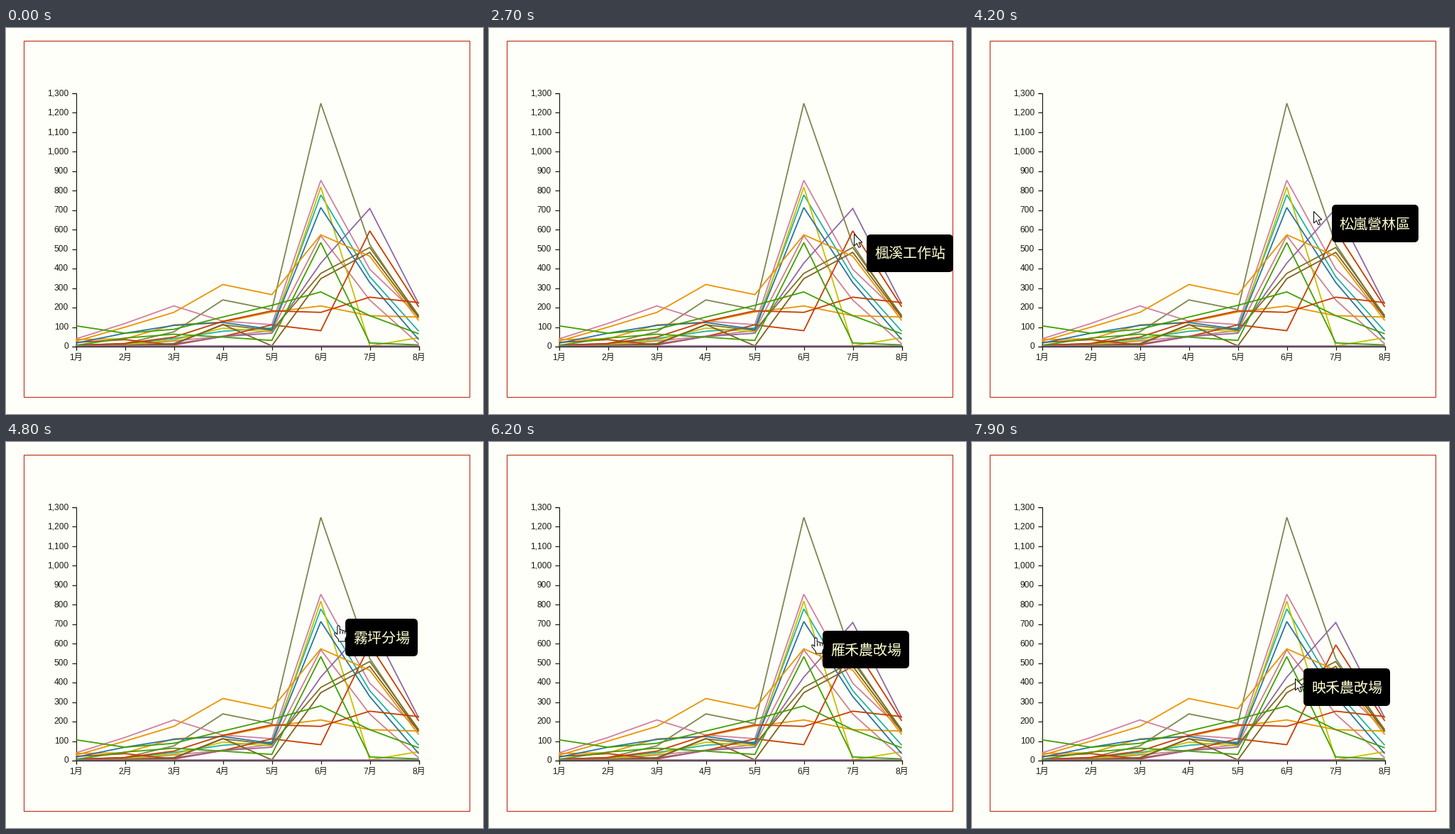
A matplotlib script that plays this animation: 672 by 544 pixels, repeating every 8000 ms.

```python
import matplotlib.pyplot as plt
import numpy as np
from matplotlib.animation import FuncAnimation
from matplotlib.patches import FancyBboxPatch, Polygon, Rectangle

W, H, DPI = 672, 544, 64
PT = 72 / DPI  # points per pixel
FRAMES, STEP = 80, 100
X0, DX, Y0, SCALE = 98.5, 69, 448, 357 / 1300
INK = "#1a1a08"
FONTS = ["Liberation Sans", "Noto Sans CJK JP"]

# colour, monthly values
SERIES = [
    ("#d08090", [0, 3, 25, 50, 78, 565, 235, 10]),
    ("#20b2a0", [0, 10, 38, 75, 92, 775, 355, 75]),
    ("#c6c000", [3, 6, 30, 91, 72, 815, 0, 42]),
    ("#7f8550", [4, 12, 72, 236, 186, 1245, 520, 145]),
    ("#d0809f", [36, 115, 205, 127, 109, 850, 393, 153]),
    ("#e89400", [33, 36, 108, 122, 174, 205, 155, 148]),
    ("#c83c00", [18, 32, 5, 48, 108, 78, 590, 200]),
    ("#9068a0", [0, 0, 10, 48, 65, 425, 705, 215]),
    ("#807020", [0, 2, 12, 108, 80, 372, 505, 155]),
    ("#80601c", [0, 2, 8, 110, 0, 345, 480, 145]),
    ("#2874a0", [14, 65, 105, 120, 85, 710, 325, 32]),
    ("#e89400", [24, 96, 172, 315, 263, 570, 460, 130]),
    ("#3fa000", [103, 65, 85, 148, 208, 277, 155, 62]),
    ("#c83c00", [3, 12, 45, 126, 180, 172, 250, 222]),
    ("#3fa000", [3, 40, 60, 45, 28, 530, 15, 5]),
    ("#9068a0", [0] * 8),
]

# pointer path: frame, x, y
PATH = np.array([
    (12, 638, 303), (18, 535, 272), (20, 514, 268), (21, 514, 268),
    (22, 521, 300), (26, 521, 301), (29, 501, 267), (31, 496, 258),
    (33, 496, 258), (34, 495, 250), (38, 495, 250), (39, 489, 251),
    (40, 489, 251), (41, 495, 257), (43, 467, 259), (45, 468, 258),
    (48, 468, 258), (49, 456, 250), (50, 456, 250), (51, 508, 343),
    (53, 461, 265), (54, 461, 265), (57, 460, 259), (60, 460, 259),
    (62, 460, 275), (63, 460, 275), (66, 460, 282), (68, 461, 300),
    (69, 465, 300), (72, 461, 306), (77, 456, 328), (79, 455, 333),
])
HAND_SPANS = [(22, 26), (29, 30), (46, 51), (53, 77)]

# first frame, left, top, text
TIPS = [
    (22, 532, 291, "楓溪工作站"),
    (29, 512, 258, "苔原農改場"),
    (34, 506, 248, "松嵐營林區"),
    (41, 507, 249, "松嵐營林區"),
    (48, 478, 249, "霧坪分場"),
    (51, 519, 334, "晨谷試驗站"),
    (53, 472, 256, "晨谷試驗站"),
    (62, 470, 266, "雁禾農改場"),
    (66, 471, 273, "竹影研究所"),
    (68, 472, 291, "晴谷工作站"),
    (73, 467, 301, "月坪營林區"),
    (77, 467, 319, "映禾農改場"),
]

ARROW = np.array([(0, 0), (0, 16.5), (3.8, 13), (6.4, 18.8), (9, 17.7),
                  (6.5, 12), (11.3, 11.6)])
HAND = np.array([(-1.7, 1.4), (0, 0), (1.7, 1.4), (1.7, 6), (4.7, 6.4),
                 (5.2, 7.2), (7.8, 7.2), (8.4, 8.4), (10.4, 8.6), (11.3, 10),
                 (11.3, 15), (9.4, 19), (9.4, 22.5), (0, 22.5), (0, 20),
                 (-5.4, 13.2), (-5.8, 10.6), (-4, 10.4), (-1.7, 12.8)])
KNUCKLES = np.array([(1.7, 6), (1.7, 11), (np.nan, np.nan), (5, 7), (5, 11),
                     (np.nan, np.nan), (8.2, 8), (8.2, 11)])

fig = plt.figure(figsize=(W / DPI, H / DPI), dpi=DPI, facecolor="#fffffa")
ax = fig.add_axes([0, 0, 1, 1])
ax.set_xlim(0, W)
ax.set_ylim(H, 0)
ax.axis("off")


def stroke(xs, ys, color=INK, width=1.2, z=2):
    return ax.plot(xs, ys, color=color, lw=width * PT, zorder=z,
                   solid_capstyle="butt", solid_joinstyle="miter")[0]


def label(x, y, s, size, color, ha, z=3):
    return ax.text(x, y, s, fontsize=size * PT, color=color, ha=ha,
                   va="baseline", family=FONTS, zorder=z)


def draw_chart():
    ax.add_patch(Rectangle((24.5, 17.5), 628, 502, fill=False,
                           ec="#bf2a10", lw=1.1 * PT))
    right = X0 + 7 * DX
    stroke([X0 - 6, X0, X0, X0 - 6], [91.5, 91.5, Y0 + .5, Y0 + .5])
    stroke([X0, X0, right, right], [Y0 + 6, Y0 + .5, Y0 + .5, Y0 + 6])
    for value in range(0, 1301, 100):
        y = Y0 - value * SCALE
        stroke([X0 - 6, X0], [round(y) + .5] * 2)
        label(88, y + 4.3, f"{value:,}", 12, INK, "right")
    xs = X0 + DX * np.arange(8)
    for i, x in enumerate(xs):
        stroke([x, x], [Y0, Y0 + 6])
        label(x, 467.6, f"{i + 1}月", 12, INK, "center")
    for color, values in SERIES:
        stroke(xs, Y0 - SCALE * np.array(values), color, 1.8, 4)


draw_chart()
tip_box = FancyBboxPatch((0, 0), 122, 53, fc="black", ec="none", zorder=6,
                         boxstyle="round,pad=0,rounding_size=6")
ax.add_patch(tip_box)
tip_text = label(0, 0, "", 20, "#ffffd0", "center", 7)
pointer = Polygon(ARROW, fc="white", ec="black", lw=PT, zorder=8)
ax.add_patch(pointer)
knuckles = stroke([], [], "black", 1, 9)


def update(i):
    shown = [t for t in TIPS if t[0] <= i]
    tip_box.set_visible(bool(shown))
    tip_text.set_visible(bool(shown))
    if shown:
        _, x, y, name = shown[-1]
        width = 20 * len(name) + 22
        tip_box.set_bounds(x, y, width, 53)
        tip_text.set_position((x + width / 2, y + 34))
        tip_text.set_text(name)

    at = np.round([np.interp(i, PATH[:, 0], PATH[:, k]) for k in (1, 2)]) + .5
    hand = any(a <= i <= b for a, b in HAND_SPANS)
    pointer.set_visible(i >= PATH[0, 0])
    pointer.set_xy((HAND if hand else ARROW) + at)
    knuckles.set_visible(hand)
    knuckles.set_data(*(KNUCKLES + at).T)
    return tip_box, tip_text, pointer, knuckles


anim = FuncAnimation(fig, update, frames=FRAMES, interval=STEP, repeat=True,
                     init_func=lambda: update(0))
plt.show()
```
